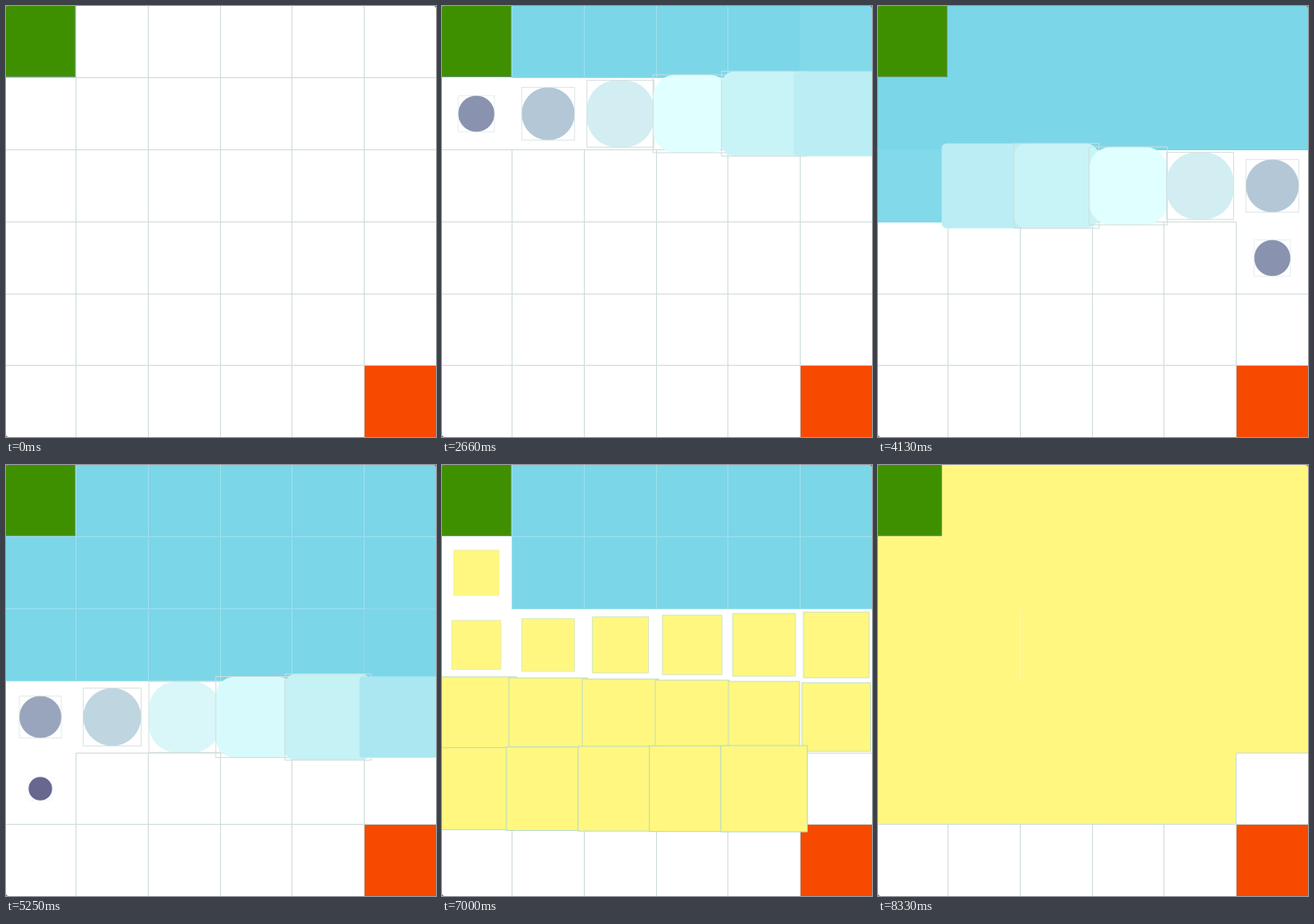
Write a matplotlib script that moves like this. It is 482x484 px and loops after 8400 ms.

```python
import numpy as np
import matplotlib.pyplot as plt
from matplotlib.animation import FuncAnimation
from matplotlib.patches import Polygon, Rectangle

W, H, DPI = 482, 484, 100
FRAMES, STEP = 120, 70          # 8400 ms loop
PX = 72 / DPI                   # one pixel in points

# Centres of the grid lines
XS = [-1.5, 78.5, 159.5, 240.5, 320.5, 401.5, 482.5]
YS = [-0.5, 80.5, 161.5, 242.5, 323.5, 403.5, 484.5]
PITCH = 80.8
START, GOAL = (0, 0), (5, 5)

GREEN, GREEN_EDGE, RED = "#3f9000", "#6f9a80", "#f74a00"
LINE, PATH_LINE = "#cfdddc", "#b9dcc8"
BLUE, YELLOW = "#7bd6e8", "#fff780"

# Search and route timing in ms
SEARCH_AT, SEARCH_GAP = 400, 210
ROUTE_AT, ROUTE_GAP = 6280, 41
LIFE = 1500

# Depth-first search snakes down the board, the route runs back up
VISITS = [(r, c) for r in range(5)
          for c in (range(6) if r % 2 == 0 else range(5, -1, -1))
          if (r, c) not in (START, (4, 5))]
VISIT_T = {cell: SEARCH_AT + SEARCH_GAP * i for i, cell in enumerate(VISITS)}
ROUTE_T = {cell: ROUTE_AT + ROUTE_GAP * i
           for i, cell in enumerate(reversed(VISITS))}

# Colour stops of a visited cell, 0..255
STOPS = [(0.0, (98, 97, 138)), (0.53, (224, 255, 255)),
         (0.75, (195, 241, 245)), (1.0, (123, 214, 232))]


def bezier_ease(x1, y1, x2, y2):
    s = np.linspace(0, 1, 300)
    a, b, c = 3 * (1 - s) ** 2 * s, 3 * (1 - s) * s ** 2, s ** 3
    xs, ys = a * x1 + b * x2 + c, a * y1 + b * y2 + c
    return lambda u: float(np.interp(u, xs, ys))


ease_out = bezier_ease(0, 0, 0.58, 1)
ease_in_out = bezier_ease(0.42, 0, 0.58, 1)


def pop_scale(u, low, peak):
    """Grow from low to 1.2 at peak, then settle to 1."""
    if u < peak:
        return low + (1.2 - low) * ease_out(u / peak)
    return 1.2 - 0.2 * ease_in_out((u - peak) / (1 - peak))


def visit_color(u):
    for (a, ca), (b, cb) in zip(STOPS, STOPS[1:]):
        if u <= b:
            ease = ease_in_out if b == 1 else ease_out
            k = ease((u - a) / (b - a))
            return (np.array(ca) * (1 - k) + np.array(cb) * k) / 255
    return BLUE


def line_alpha(u, peak):
    """Outline appears with growth and fades after the peak."""
    if u < peak:
        return ease_out(u / peak) ** 0.5
    return max(0.0, 1 - 4 * (u - peak) / (1 - peak))


fig = plt.figure(figsize=(W / DPI, H / DPI), dpi=DPI, facecolor="white")
ax = fig.add_axes([0, 0, 1, 1])


def box(x0, y0, x1, y1, fill="none", edge="none", alpha=None):
    ax.add_patch(Rectangle((x0, y0), x1 - x0, y1 - y0, facecolor=fill,
                           edgecolor=edge, linewidth=PX, alpha=alpha,
                           snap=False))


def cell_box(cell, grow=0.0, **style):
    r, c = cell
    box(XS[c] - grow, YS[r] - grow, XS[c + 1] + grow, YS[r + 1] + grow, **style)


def rounded(cx, cy, size, radius, color):
    inner = size / 2 - radius
    pts = []
    for i, (sx, sy) in enumerate([(1, 1), (-1, 1), (-1, -1), (1, -1)]):
        a = np.linspace(i, i + 1, 16) * np.pi / 2
        pts.append(np.column_stack([cx + sx * inner + radius * np.cos(a),
                                    cy + sy * inner + radius * np.sin(a)]))
    ax.add_patch(Polygon(np.vstack(pts), facecolor=color, edgecolor="none",
                         snap=False))


def draw_moving(cell, u, is_route):
    r, c = cell
    cx, cy = (XS[c] + XS[c + 1]) / 2, (YS[r] + YS[r + 1]) / 2
    if is_route:
        peak, low, radius = 0.5, 0.6, 0
        color, line = YELLOW, PATH_LINE
    else:
        peak, low, radius = 0.75, 0.3, min(0.5, 1 - ease_out(u))
        color, line = visit_color(u), LINE
    size = PITCH * pop_scale(u, low, peak)
    half = size / 2
    if radius:
        rounded(cx, cy, size, radius * size, color)
    else:
        box(cx - half, cy - half, cx + half, cy + half, fill=color)
    box(cx - half, cy - half, cx + half, cy + half, edge=line,
        alpha=line_alpha(u, peak))


def draw(frame):
    t = frame * STEP
    ax.clear()
    ax.set_xlim(0, W)
    ax.set_ylim(H, 0)
    ax.axis("off")

    # Lines between visited cells are hidden during rightward sweeps
    head = (t - SEARCH_AT) // SEARCH_GAP
    seams = not (0 < head < len(VISITS) and VISITS[head - 1][0] in (2, 4))

    moving = []
    for r in range(6):
        for c in range(6):
            cell = (r, c)
            if cell == START:
                box(0, 0, 78, 80, fill=GREEN_EDGE)
                box(0, 0, 77, 79, fill=GREEN)
                continue
            if cell == GOAL:
                cell_box(cell, grow=-0.5, fill=RED)
                continue
            is_route = t >= ROUTE_T.get(cell, np.inf)
            born = (ROUTE_T if is_route else VISIT_T).get(cell, np.inf)
            if t < born:
                cell_box(cell, edge=LINE)
            elif t < born + LIFE:
                moving.append((cell, (t - born) / LIFE, is_route))
            elif is_route:
                cell_box(cell, grow=0.5, fill=YELLOW)
            else:
                cell_box(cell, grow=0.5, fill=BLUE)
                if seams:
                    cell_box(cell, edge="white", alpha=0.25)

    for item in moving:
        draw_moving(*item)

    # Dark specks of the rounded window corners
    for x, y, dx, dy in [(0, 0, 2, 2), (W, 0, -2, 2), (0, H, 2, -2)]:
        ax.add_patch(Polygon([(x, y), (x + dx, y), (x, y + dy)],
                             facecolor="#777777", edgecolor="none"))
    return []


anim = FuncAnimation(fig, draw, frames=FRAMES, interval=STEP,
                     init_func=lambda: [], repeat=True, repeat_delay=0)
plt.show()
```
